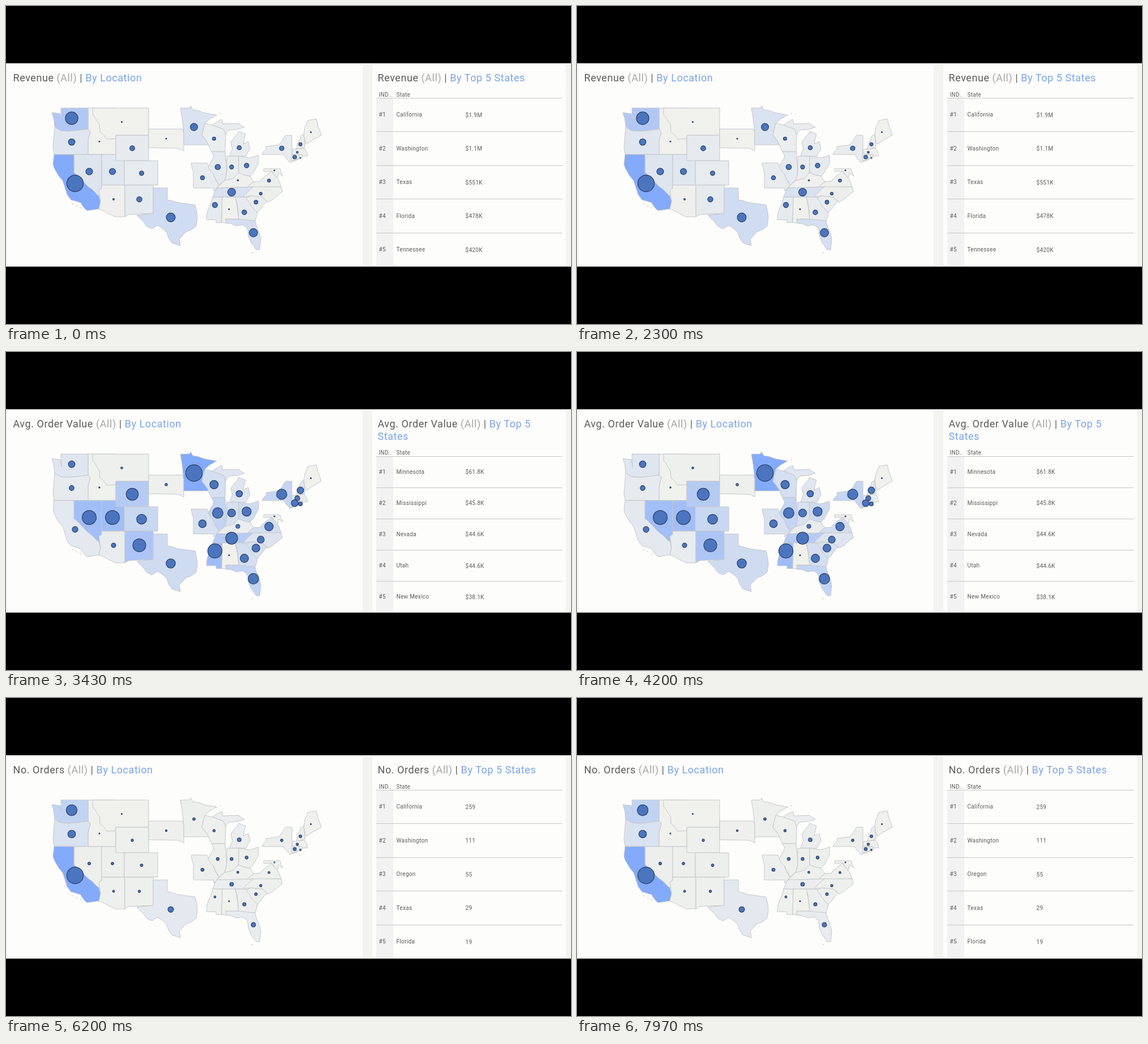
An HTML page that plays this animation: 998x561 px, repeating every 8000 ms.

```html
<!DOCTYPE html>
<html lang="en">
<head>
<meta charset="utf-8">
<title>Sales by state</title>
<style>
  html, body { margin: 0; width: 100%; height: 100%; overflow: hidden; background: #000; }
  #stage { position: relative; width: 998px; height: 561px; overflow: hidden; font-family: Roboto, sans-serif; }
  svg { position: absolute; left: 0; top: 0; }
  h2 { position: absolute; top: 116px; margin: 0; font-size: 18px; font-weight: 400;
       line-height: 21.5px; letter-spacing: .56px; color: #5c5c5c; }
  h2 i { font-style: normal; color: #a6a6a6; }
  h2 b { font-weight: 400; color: #7ba3e8; }
  #mapTitle { left: 12.5px; width: 600px; }
  #tableTitle { left: 656.5px; width: 310px; }
  #table text { font-size: 10px; letter-spacing: .3px; fill: #5a5a5a; }
  #table line { stroke: #c6c6c6; }
  #states path, #islands { stroke: #c5c7ca; stroke-linejoin: round; }
  #islands { fill: none; stroke-dasharray: 4 4; }
  #dots circle { fill: #4b75be; stroke: #2c4168; stroke-width: 1.2; }
</style>
</head>
<body>
<div id="stage">
  <svg width="998" height="561" viewBox="0 0 998 561">
    <rect y="101" width="998" height="358.75" fill="#f3f3f0"/>
    <rect x="2" y="103" width="628" height="356" fill="#fdfdfc"/>
    <rect x="647" y="103" width="342" height="356" fill="#fdfdfc"/>
    <g id="states"></g>
    <path id="islands" d="M116 348L134 357M433 436l5-2M370 194l10-5"/>
    <g id="dots"></g>
    <g id="table"></g>
  </svg>
  <h2 id="mapTitle"></h2>
  <h2 id="tableTitle"></h2>
</div>
<script>
const LOOP = 8000, FADE = 300;
const MAX_R = 14.6, MIN_R = 1, LOW = [240, 241, 237], HIGH = [131, 170, 251];

const $ = id => document.getElementById(id);
const add = (parent, tag, attrs, text = '') => {
  const el = document.createElementNS('http://www.w3.org/2000/svg', tag);
  for (const k in attrs) el.setAttribute(k, attrs[k]);
  el.textContent = text;
  return parent.appendChild(el);
};
const mix = (a, b, k) => a + (b - a) * k;
const noise = (x, y) => {
  const n = Math.sin(x * 12.99 + y * 78.23) * 43758.5;
  return n - Math.floor(n) - .5;
};

// Surveyed borders stay straight; slanted ones get a natural roughness.
// The noise depends on place alone, so neighbours share the same edge.
function roughen([x1, y1], [x2, y2]) {
  const dx = x2 - x1, dy = y2 - y1, length = Math.hypot(dx, dy);
  if (length < 8 || Math.min(Math.abs(dx), Math.abs(dy)) < 4) return [[x1, y1]];
  const mx = (x1 + x2) / 2, my = (y1 + y2) / 2, size = length * .13;
  const mid = [mx + noise(mx, my) * size, my + noise(my, mx) * size];
  return [...roughen([x1, y1], mid), ...roughen(mid, [x2, y2])];
}

const outline = corners => corners.split(' / ').map(part => {
  const points = part.split(' ').map(p => p.split(',').map(Number));
  return 'M' + points.flatMap((p, i) => roughen(p, points[(i + 1) % points.length])).join('L') + 'z';
}).join('');

// Later states cover earlier ones. Average order value is in thousands of dollars.
const states = [];
function state(name, x, y, orders, average, corners) {
  states.push({
    name, orders, average, revenue: orders * average,
    shape: add($('states'), 'path', { d: outline(corners) }),
    dot: add($('dots'), 'circle', { cx: x, cy: y })
  });
}
state('Idaho', 165, 239, 1, .4, '145,180 194,180 194,262 145,262 145,237 149,222 145,217');
state('Montana', 204.5, 204.5, 1, .9, '153,180 252,180 252,228 194,228 194,234 178,235 166,222 165,209 153,192');
state('Washington', 116, 198, 111, 9.9, '81,188 96,190 98,203 97,180 145,180 145,217 111,221 97,220 86,213');
state('Oregon', 116, 240, 55, 5.3, '86,213 97,220 111,221 145,217 149,222 145,237 145,262 85,262 83,250');
state('Nevada', 147, 292, 7, 44.6, '120,262 169,262 169,322 164,335 120,294');
state('California', 122, 313, 259, 7.34, '85,262 120,262 120,294 164,335 167,345 164,358 143,361 132,347 115,342 104,320 100,308 88,291 83,279');
state('Utah', 188, 292, 6, 44.6, '169,262 209,262 209,316 169,316');
state('Wyoming', 223, 251, 5, 33, '194,228 252,228 252,273 194,273');
state('Colorado', 239.5, 295, 6, 22, '209,273 268,273 268,316 209,316');
state('Arizona', 190, 341, 4, 4.4, '169,316 210,316 210,372 193,372 164,358 167,345 164,325 169,322');
state('New Mexico', 235.5, 341, 5, 38.1, '210,316 260,316 260,366 231,367 217,368 210,372');
state('Texas', 291, 373, 29, 19, '260,321 285,321 285,342 319,349 334,351 338,374 336,388 316,400 306,411 308,423 293,418 284,400 267,387 258,393 248,388 231,369 260,366');
state('South Dakota', 283, 234, 3, 1.3, '252,217 312,217 314,225 314,256 303,251 252,250');
state('Minnesota', 332, 213.5, 6, 61.8, '308,180 324,180 326,176 330,183 371,192 351,207 349,215 346,228 358,245 314,245 314,225');
state('Wisconsin', 367.5, 234, 5, 16, '351,207 365,210 384,217 388,227 387,257 363,257 358,245 346,228 349,215');
state('Michigan', 412, 250, 13, 9.5, '365,210 381,200 383,208 410,207 421,214 394,219 388,227 384,217 / 395,265 400,252 397,240 411,221 423,226 419,243 428,239 431,252 424,265');
state('Missouri', 347, 303, 9, 13.5, '327,277 355,277 376,316 367,327 367,321 331,321 331,293');
state('Illinois', 374, 284, 8, 25, '363,257 387,257 390,291 386,308 376,316 367,297 357,284 367,264');
state('Kentucky', 409.5, 307.5, 4, 3.6, '373,321 386,308 411,294 431,300 438,310 426,320');
state('Indiana', 398.5, 284, 8, 14, '390,265 411,265 411,294 402,304 386,308 390,291');
state('Ohio', 425, 281.5, 8, 19, '411,265 430,268 446,263 446,277 431,300 411,294');
state('Virginia', 464.5, 308, 4, 16.5, '426,320 486,319 482,308 469,291 457,301 449,309 438,310');
state('Maryland', 474, 290, 1, .2, '455,287 484,287 489,300 481,294 480,303 469,291 455,292');
state('North Carolina', 450, 331, 5, 11, '437,319 486,319 488,328 479,335 463,346 453,337 432,335 416,337');
state('Tennessee', 398.5, 328.5, 13, 32.3, '365,337 372,321 437,319 418,337');
state('Mississippi', 369, 351, 4, 45.8, '365,337 382,337 381,382 371,382 371,377 354,377 358,356');
state('Alabama', 394, 358.5, 1, .2, '382,337 405,337 411,376 388,376 389,383 381,382');
state('Georgia', 421, 364, 10, 15.5, '405,337 426,337 444,364 440,379 411,378 410,363');
state('South Carolina', 441.5, 346, 7, 14, '424,339 432,335 453,337 461,345 444,364');
state('Florida', 437, 400, 19, 25.16, '388,376 411,376 440,379 450,412 448,430 442,430 428,406 427,394 418,386 407,388 389,383');
state('New York', 487, 251, 6, 24, '452,262 460,252 459,248 481,245 494,228 505,228 505,268 517,270 501,276 490,262');
state('Maine', 538.5, 222.5, 1, .2, '530,244 526,226 533,202 548,199 557,228 542,236');
state('New Hampshire', 520, 244, 7, 10, '513,253 528,249 526,226 521,229 515,242');
state('Massachusetts', 514.5, 258, 5, 5.6, '505,262 506,253 527,251 533,264 524,265 518,262');
state('Connecticut', 510, 266.5, 9, 10.5, '505,262 518,262 518,269 504,273');
state('Rhode Island', 520, 268, 2, 3.4, '518,262 523,262 523,267 518,269');

const views = [
  { start: 0, key: 'revenue', name: 'Revenue', top: 162.5,
    format: v => v < 1000 ? `$${v.toFixed(0)}K` : `$${(v / 1000).toFixed(1)}M` },
  { start: 2490, key: 'average', name: 'Avg. Order Value', top: 184, format: v => `$${v.toFixed(1)}K` },
  { start: 5010, key: 'orders', name: 'No. Orders', top: 162.5, format: String }
];
for (const view of views) {
  view.pitch = (459.5 - view.top) / 5;
  view.ranked = [...states].sort((a, b) => b[view.key] - a[view.key]);
  view.max = view.ranked[0][view.key];
}

// CSS "ease": cubic-bezier(.25, .1, .25, 1)
function ease(x) {
  if (x >= 1) return 1;
  const curve = (u, a, b) => 3 * u * (1 - u) ** 2 * a + 3 * u * u * (1 - u) * b + u ** 3;
  let lo = 0, hi = 1;
  for (let i = 0; i < 20; i++) {
    const mid = (lo + hi) / 2;
    if (curve(mid, .25, .25) < x) lo = mid; else hi = mid;
  }
  return curve(lo, .1, 1);
}

let shown, amounts;

function showView(view) {
  const { name, key, top, pitch, format } = view, table = $('table');
  const title = by => `${name} <i>(All)</i> | <b>By ${by}</b>`;
  const rule = y => add(table, 'line', { x1: 654, x2: 983, y1: y, y2: y });
  const text = (x, y, content) => add(table, 'text', { x, y }, content);
  $('mapTitle').innerHTML = title('Location');
  $('tableTitle').innerHTML = title('Top 5 States');
  table.textContent = '';
  add(table, 'rect', { x: 654, y: top, width: 30, height: 459 - top, fill: '#f2f2f2' });
  text(658.5, top - 3, 'IND..');
  text(689.5, top - 3, 'State');
  amounts = view.ranked.slice(0, 5).map((s, i) => {
    const y = top + pitch * (i + .5) + 3.2;
    rule(Math.floor(top + pitch * i) + .5);
    text(658.5, y, '#' + (i + 1));
    text(689.5, y, s.name);
    return text(811.5, y, format(s[key]));
  });
  shown = view;
}

function draw() {
  const t = performance.now() % LOOP;
  const index = views.findLastIndex(v => t >= v.start);
  const from = views[Math.max(index - 1, 0)], to = views[index];
  const k = ease((t - to.start) / FADE);
  if (to !== shown) showView(to);

  for (const s of states) {
    const a = s[from.key] / from.max, b = s[to.key] / to.max;
    const tint = LOW.map((c, i) => Math.round(mix(c, HIGH[i], mix(a, b, k))));
    s.shape.style.fill = `rgb(${tint})`;
    s.dot.setAttribute('r', Math.max(MIN_R, MAX_R * mix(Math.sqrt(a), Math.sqrt(b), k)));
  }
  const pitch = mix(from.pitch, to.pitch, k);
  amounts.forEach((el, i) => el.setAttribute('y', to.top + pitch * (i + .5) + 3.7));
  requestAnimationFrame(draw);
}
draw();
</script>
</body>
</html>
```
